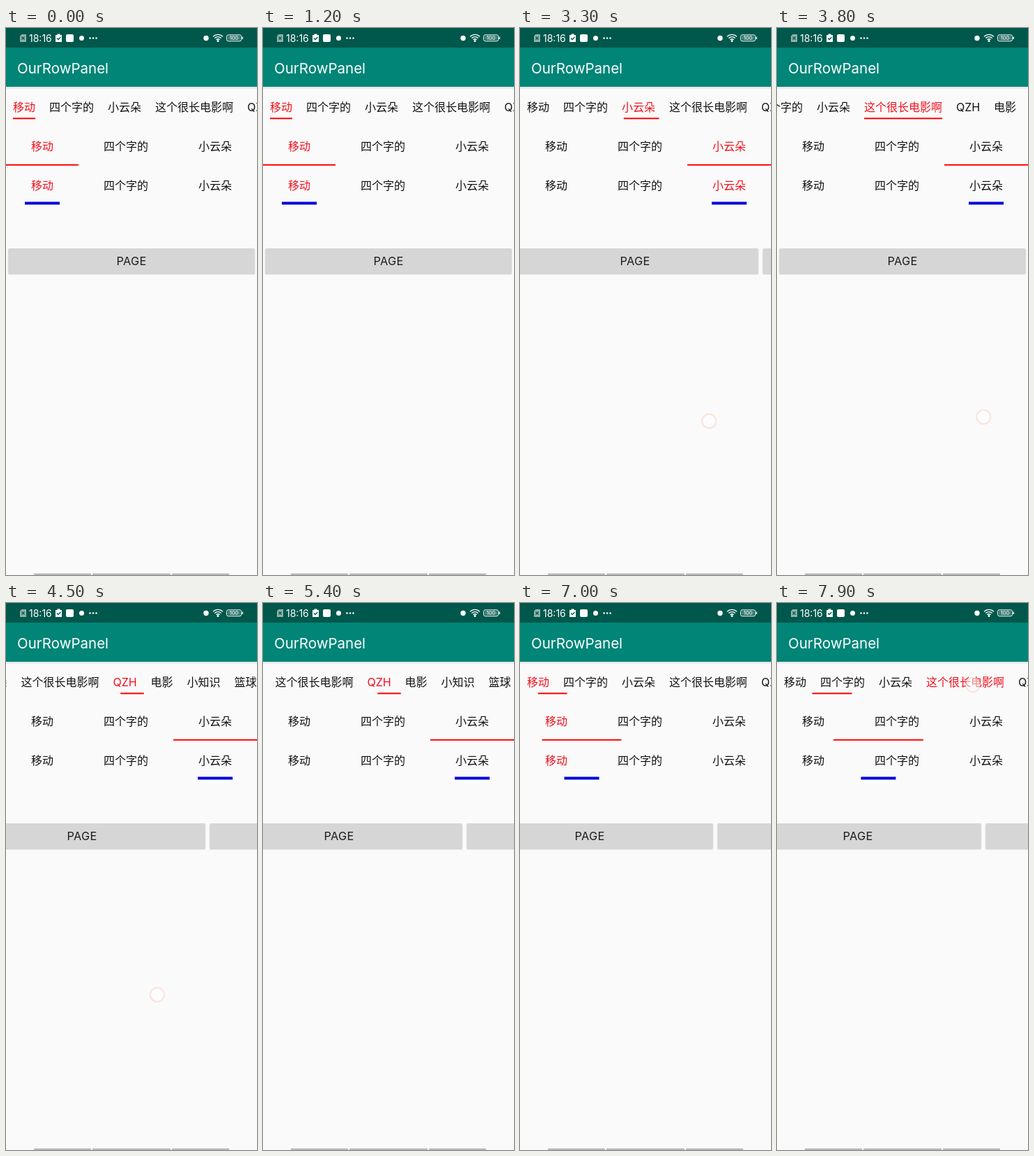
An HTML page that plays this animation: 360x782 px, repeating every 8000 ms.

```html
<!DOCTYPE html>
<html lang="zh">
<head>
<meta charset="utf-8">
<title>Tabs</title>
<style>
  html, body { margin: 0; width: 100%; height: 100%; overflow: hidden; background: #fafafa; }
  svg { display: block; width: 360px; height: 782px; }
  text { font-family: Inter, "Noto Sans CJK SC", "Noto Sans CJK", sans-serif; font-size: 16px; fill: #111; }
  .tab { text-anchor: middle; }
  .tab.on { fill: #f30f1c; }
  .title { font-size: 20.5px; fill: #fff; }
  .clock { font-size: 14px; fill: #fff; }
  .battery { font-size: 7.5px; fill: #fff; text-anchor: middle; }
  .label { font-size: 16.3px; text-anchor: middle; letter-spacing: .3px; fill: #1c1c1c; }
</style>
</head>
<body>
<svg viewBox="0 0 360 782">
  <defs>
    <linearGradient id="shade" x2="0" y2="1">
      <stop stop-color="#000" stop-opacity=".11"/>
      <stop offset="1" stop-color="#000" stop-opacity="0"/>
    </linearGradient>
    <g id="page">
      <rect x="2.5" y="315" width="355" height="38" rx="2.5" fill="#000" opacity=".07"/>
      <rect x="3.5" y="316" width="353" height="36" rx="2" fill="#000" opacity=".08"/>
      <rect x="3.5" y="315" width="353" height="36" rx="2" fill="#d6d6d6"/>
      <text class="label" x="180" y="339.3">PAGE</text>
    </g>
  </defs>
  <rect width="360" height="782" fill="#fafafa"/>

  <g id="row0"></g>
  <g id="row1"></g>
  <g id="row2"></g>
  <use href="#page" class="page"/>
  <use href="#page" class="page"/>

  <rect y="84" width="360" height="4" fill="url(#shade)"/>
  <rect y="28" width="360" height="56" fill="#008577"/>
  <rect width="360" height="28" fill="#00574b"/>
  <text class="title" x="16" y="65">OurRowPanel</text>

  <!-- status bar -->
  <path d="M22.5 9H29V20H20V11.5Z" fill="#8db0aa"/>
  <path d="M22.5 12.5l4 4m0-4l-4 4" stroke="#00574b" stroke-width="1.2"/>
  <text class="clock" x="33" y="19.5">18:16</text>
  <path d="M71 10h2.5V8.5h4V10H80v10h-9z" fill="#fff"/>
  <path d="M73 14.5l2 2 3.5-3.5" fill="none" stroke="#00574b" stroke-width="1.3"/>
  <rect x="86" y="9" width="11" height="11" rx="2" fill="#fff"/>
  <circle cx="108.5" cy="14.5" r="3.5" fill="#fff"/>
  <g fill="#fff">
    <circle cx="120.5" cy="14.5" r="1.3"/>
    <circle cx="125" cy="14.5" r="1.3"/>
    <circle cx="129.5" cy="14.5" r="1.3"/>
    <circle cx="287" cy="14.5" r="3.7"/>
    <circle cx="304" cy="18.5" r="1.5"/>
  </g>
  <g fill="none" stroke="#fff" stroke-width="1.4">
    <path d="M297 12.2a10 10 0 0 1 14 0M299.3 14.6a6.6 6.6 0 0 1 9.4 0M301.5 16.8a3.5 3.5 0 0 1 5 0"/>
    <rect x="316.5" y="9.8" width="21" height="9" rx="2.5" stroke-width="1"/>
    <path d="M339.3 12.5v3.5"/>
  </g>
  <rect x="318" y="11.3" width="18" height="6" rx="1" fill="#fff" opacity=".28"/>
  <text class="battery" x="327" y="17.1">100</text>

  <path d="M40 781H122M124 781H236M238 781H320" stroke="#b9b9b9" stroke-width="2.5"/>
  <circle id="finger" r="10" fill="#fff" fill-opacity=".5" stroke="#f9cdb8" stroke-opacity=".5" stroke-width="2"/>
</svg>

<script>
const LOOP = 8000, STEP = 100;
const DRAG = 200, SETTLE = 300, SLOP = 4;
const LAG = 22; // indicators trail the settling pages
const TAP = { press: 7780, release: 7843, to: 3, time: 600, x: 281, y: 117 };

// press time, direction, finger start x, y, drag length
const SWIPES = [
  [2050, 1, 286, 576, 150],
  [2680, 1, 285, 568, 150],
  [3250, 1, 290, 562, 150],
  [3790, 1, 297, 556, 150],
  [4400, 1, 292, 560, 150],
  [5092, -1, 258, 552, 94],
  [5450, -1, 262, 556, 94],
  [5820, -1, 264, 548, 94],
  [6200, -1, 268, 538, 94],
  [6700, -1, 262, 545, 94]
];

const clamp = (v, lo, hi) => Math.min(hi, Math.max(lo, v));
const lerp = (a, b, u) => a + (b - a) * u;
const easeInOut = u => u < .5 ? 2 * u * u : 1 - 2 * (1 - u) ** 2;
const easeOut = (u, power) => 1 - (1 - clamp(u, 0, 1)) ** power;
const $ = id => document.getElementById(id);

function add(parent, tag, attrs, text = '') {
  const el = document.createElementNS('http://www.w3.org/2000/svg', tag);
  set(el, attrs);
  el.textContent = text;
  return parent.appendChild(el);
}
function set(el, attrs) {
  for (const key in attrs) el.setAttribute(key, attrs[key]);
}

const NAMES = ['移动', '四个字的', '小云朵', '这个很长电影啊', 'QZH', '电影', '小知识', '篮球'];
const CENTERS = [52, 172, 300];

let edge = 10;
const spans = [32, 64, 48, 112, 34, 32, 48, 32].map(w => {
  const span = [edge, edge + w];
  edge += w + 20;
  return span;
});
const maxScroll = edge - 10 - 360;
const middle = ([a, b]) => (a + b) / 2;

function makeRow(id, bars, centers, textY, barY, thick, color) {
  const group = $(id);
  const tabs = centers.map((x, i) => add(group, 'text', { class: 'tab', x, y: textY }, NAMES[i]));
  const bar = add(group, 'rect', { y: barY, height: thick, fill: color });
  return { group, bars, tabs, bar };
}
const rows = [
  makeRow('row0', spans, spans.map(middle), 119, 128.3, 2, '#f00'),
  makeRow('row1', [[0, 104], [104, 240], [240, 360]], CENTERS, 175, 194.7, 2, '#f00'),
  makeRow('row2', CENTERS.map(c => [c - 25, c + 25]), CENTERS, 231, 248.5, 4, '#00d')
];
const pages = document.querySelectorAll('.page');

function spanAt(bars, pos) {
  const p = clamp(pos, 0, bars.length - 1);
  const i = Math.min(Math.floor(p), bars.length - 2);
  return [0, 1].map(side => lerp(bars[i][side], bars[i + 1][side], p - i));
}

function swipeShare(t, press, length, lag) {
  const u = clamp((t - press) / DRAG, 0, 1);
  const dragged = Math.max(0, length * easeInOut(u) - SLOP) / 360;
  return lerp(dragged, 1, easeOut((t - press - DRAG - lag) / SETTLE, 3));
}

function position(t, lag) {
  let pos = 0;
  for (const [press, dir, , , length] of SWIPES) pos += dir * swipeShare(t, press, length, lag);
  return pos + TAP.to * easeOut((t - TAP.release - lag) / TAP.time, 5);
}

function selectedAt(t) {
  if (t >= TAP.release) return TAP.to;
  return SWIPES.reduce((n, [press, dir]) => n + (t >= press + DRAG ? dir : 0), 0);
}

function fingerAt(t) {
  if (t >= TAP.press) return [TAP.x, TAP.y];
  const swipe = SWIPES.find(([press]) => t >= press && t < press + DRAG);
  if (!swipe) return null;
  const [press, dir, x, y, length] = swipe;
  return [x - dir * length * easeInOut((t - press) / DRAG), y];
}

function draw(t) {
  const pos = position(t, 0), mark = position(t, LAG), selected = selectedAt(t);

  for (const { bars, tabs, bar } of rows) {
    const [a, b] = spanAt(bars, mark);
    set(bar, { x: a, width: b - a });
    tabs.forEach((tab, i) => tab.classList.toggle('on', i === selected));
  }
  const scroll = clamp(middle(spanAt(spans, mark)) - 181, 0, maxScroll);
  set(rows[0].group, { transform: `translate(${-scroll} 0)` });

  const first = Math.floor(pos + 1e-6);
  pages.forEach((page, i) => set(page, { x: Math.round((first + i - pos) * 360) }));

  const at = fingerAt(t);
  set($('finger'), at ? { cx: at[0], cy: at[1], visibility: 'visible' } : { visibility: 'hidden' });
}

const start = performance.now();
function tick() {
  const t = (performance.now() - start) % LOOP;
  draw(Math.floor(t / STEP) * STEP);
  requestAnimationFrame(tick);
}
tick();
</script>
</body>
</html>
```
